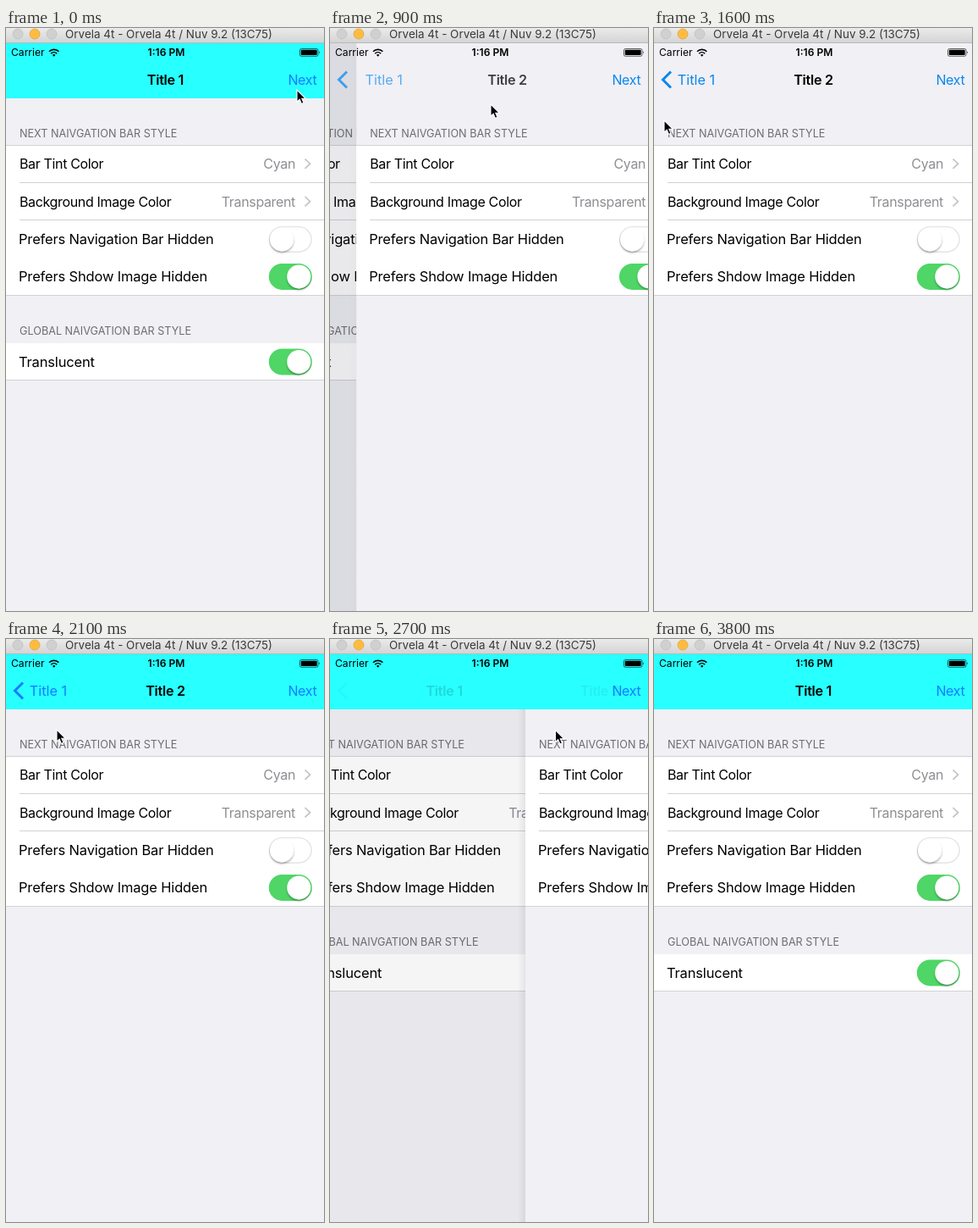
Write an HTML page that moves like this. It is 376 px wide and 688 px high and loops after 3900 ms.

```html
<!DOCTYPE html>
<html lang="en">
<head>
<meta charset="utf-8">
<title>Navigation bar styles</title>
<style>
  html, body { margin: 0; width: 100%; height: 100%; overflow: hidden; background: #f0f0f5; }
  svg { display: block; width: 376px; height: 688px; font-family: Inter, Roboto, sans-serif; }
  .item { font-size: 16px; letter-spacing: -.35px; }
  .pref { font-size: 16.5px; letter-spacing: -.17px; }
  .value { fill: #8e8e93; }
  .head { font-size: 12.65px; fill: #6d6d72; }
  .title { font-size: 16.2px; font-weight: 600; letter-spacing: -.3px; }
  .status { font-size: 12.1px; }
  .mid { text-anchor: middle; }
  .end { text-anchor: end; }
  .link { fill: var(--tint); }
  .line { stroke: #d2d2d6; }
</style>
</head>
<body>
<svg viewBox="0 0 376 688">
  <defs>
    <linearGradient id="chrome" x2="0" y2="1">
      <stop stop-color="#ebebeb"/><stop offset="1" stop-color="#d3d3d3"/>
    </linearGradient>
    <linearGradient id="shadow">
      <stop stop-color="#000" stop-opacity="0"/><stop offset="1" stop-color="#000" stop-opacity=".18"/>
    </linearGradient>
    <filter id="drop" x="-30%" y="-30%" width="160%" height="170%">
      <feDropShadow dx="0" dy="1.8" stdDeviation="1.1" flood-opacity=".34"/>
    </filter>
  </defs>

  <g id="first"></g>
  <rect id="dim" width="376" height="688" fill="#101028"/>
  <g id="second"><rect id="edge" x="-9" y="18" width="9" height="670" fill="url(#shadow)"/></g>

  <rect id="bar" y="18" width="376" height="65" fill="#28ffff"/>
  <path id="chevron" d="M20 51.5L10.5 61l9.5 9.5" fill="none" stroke="var(--tint)" stroke-width="3"/>
  <text id="back" class="link mid" y="67" font-size="16.3">Title 1</text>
  <text id="title1" class="title mid" y="67">Title 1</text>
  <text id="title2" class="title mid" y="67">Title 2</text>
  <text class="item link end" x="367.3" y="67">Next</text>

  <g class="status">
    <text x="6" y="33">Carrier</text>
    <text class="mid" x="189.5" y="33" font-weight="600">1:16 PM</text>
    <path d="M51 27.8a8 8 0 0 1 11.4 0M53.2 30.2a5 5 0 0 1 7 0" fill="none" stroke="#000" stroke-width="1.6"/>
    <path d="M54.9 31.8a2.6 2.6 0 0 1 3.6 0l-1.8 1.9z"/>
    <rect x="347.5" y="24.5" width="21.5" height="8.8" rx="1.8" fill="none" stroke="#000" stroke-width=".6"/>
    <rect x="348.8" y="25.8" width="18.9" height="6.2" rx=".8"/>
    <path d="M370 27.3q1.4 1.6 0 3.2z"/>
  </g>

  <rect width="376" height="18" fill="url(#chrome)"/>
  <path d="M0 17.5h376" stroke="#b9b9b9"/>
  <g stroke-width=".7">
    <circle cx="14" cy="7" r="6" fill="#d0d0d0" stroke="#bebebe"/>
    <circle cx="34" cy="7" r="6" fill="#fdbc40" stroke="#e0a135"/>
    <circle cx="54" cy="7" r="6" fill="#d0d0d0" stroke="#bebebe"/>
  </g>
  <text class="mid" x="192.5" y="12" font-size="13.45" fill="#3a3a3a">Orvela 4t - Orvela 4t / Nuv 9.2 (13C75)</text>

  <path id="cursor" d="M0 0v14.2l3.2-3 2.2 5.2 2.6-1.1-2.2-5h4.5z" stroke="#fff" stroke-width="1.1"/>
</svg>

<script>
const $ = id => document.getElementById(id);
const LOOP = 3900, STEP = 100, WIDTH = 376;
const PUSH = 647, POP = 2050, RATE = .0163;

const text = (cls, x, y, s) => `<text class="${cls}" x="${x}" y="${y}">${s}</text>`;
const line = (x, y) => `<path class="line" d="M${x} ${y}H376"/>`;

function toggle(y, on) {
  const track = on ? 'fill="#4fd666" stroke="#4fd666"' : 'fill="#fff" stroke="#e4e4e6"';
  return `<rect x="311.5" y="${y - 14.8}" width="49.6" height="29.6" rx="14.8" ${track} stroke-width="1.4"/>
    <circle cx="${on ? 346.3 : 326.1}" cy="${y}" r="14" fill="#fff" filter="url(#drop)"/>`;
}

const choice = (y, name, value) => text('item', 16, y + 6, name)
  + text('item value end', 342, y + 6, value)
  + `<path d="M353.5 ${y - 5.5}l6 5.7-6 5.7" fill="none" stroke="#c2c2c7" stroke-width="1.7"/>`;

const option = (y, name, on) => text('pref', 15, y + 6, name) + toggle(y + .4, on);

const block = (y, h) => `<rect y="${y}" width="376" height="${h}" fill="#fff"/>`;

const page = `<rect y="18" width="376" height="670" fill="#f0f0f5"/>`
  + text('head', 16, 128.6, 'NEXT NAIVGATION BAR STYLE')
  + block(138, 178) + line(0, 138.5) + line(16, 182.5) + line(16, 226.5) + line(0, 315.5)
  + choice(160, 'Bar Tint Color', 'Cyan')
  + choice(204.5, 'Background Image Color', 'Transparent')
  + option(249, 'Prefers Navigation Bar Hidden', false)
  + option(293, 'Prefers Shdow Image Hidden', true);

const globalGroup = text('head', 16, 361.6, 'GLOBAL NAIVGATION BAR STYLE')
  + block(372, 44) + line(0, 415.5)
  + option(393.5, 'Translucent', true);

$('first').innerHTML = page + globalGroup;
$('second').insertAdjacentHTML('beforeend', page);

// Each key is [time, value, ...]
const drag = [[2100, 0], [2200, 18], [2300, 54], [2400, 98], [2500, 145],
  [2700, 231], [2800, 290], [2900, 350], [3000, 376]];
const pointer = [[0, 344, 73], [300, 347, 68], [600, 345, 66], [700, 321, 71], [900, 190, 90],
  [1100, 69, 105], [1300, 32, 108], [1600, 12, 109], [1900, 16, 108], [2100, 60, 107],
  [2400, 141, 104.5], [2700, 266.5, 107.5], [2900, 335, 108], [3100, 360, 107], [3400, 390, 106]];

function track(keys, t, i = 1) {
  const n = keys.findIndex(k => k[0] > t);
  if (n < 0) return keys[keys.length - 1][i];
  if (n === 0) return keys[0][i];
  const a = keys[n - 1], b = keys[n];
  return a[i] + (b[i] - a[i]) * (t - a[0]) / (b[0] - a[0]);
}

function pageLeft(t) {
  if (t < PUSH) return WIDTH;
  if (t > 1250) return track(drag, t);
  const s = (t - PUSH) * RATE;
  return WIDTH * (1 + s) * Math.exp(-s);
}

const move = (id, x, y = 0) => $(id).setAttribute('transform', `translate(${x} ${y})`);
const fade = (id, o) => $(id).setAttribute('opacity', o);

function draw(t) {
  const left = pageLeft(t), p = 1 - left / WIDTH;
  const pushing = t < POP, clear = pushing && t >= PUSH;
  const q = pushing ? p ** 1.2 : p;

  move('first', -.3 * WIDTH * p);
  move('second', left);
  fade('second', p > 0 ? 1 : 0);
  fade('dim', .1 * p);
  fade('edge', pushing ? 1 - p : p);
  fade('bar', clear ? 0 : 1);
  document.body.style.setProperty('--tint', clear ? '#0a87ec' : '#147cff');

  const x = 188.5 - 138.5 * q;
  move('title1', x);
  move('back', x);
  move('title2', 188.5 + 213 * (1 - q));
  fade('title1', (1 - q) ** 4);
  fade('back', q ** 4);
  fade('title2', q ** 3);
  fade('chevron', q ** 3);

  move('cursor', track(pointer, t), track(pointer, t, 2));
}

const start = performance.now();
function tick() {
  const t = (performance.now() - start) % LOOP;
  draw(Math.floor(t / STEP) * STEP);
  requestAnimationFrame(tick);
}
tick();
</script>
</body>
</html>
```
